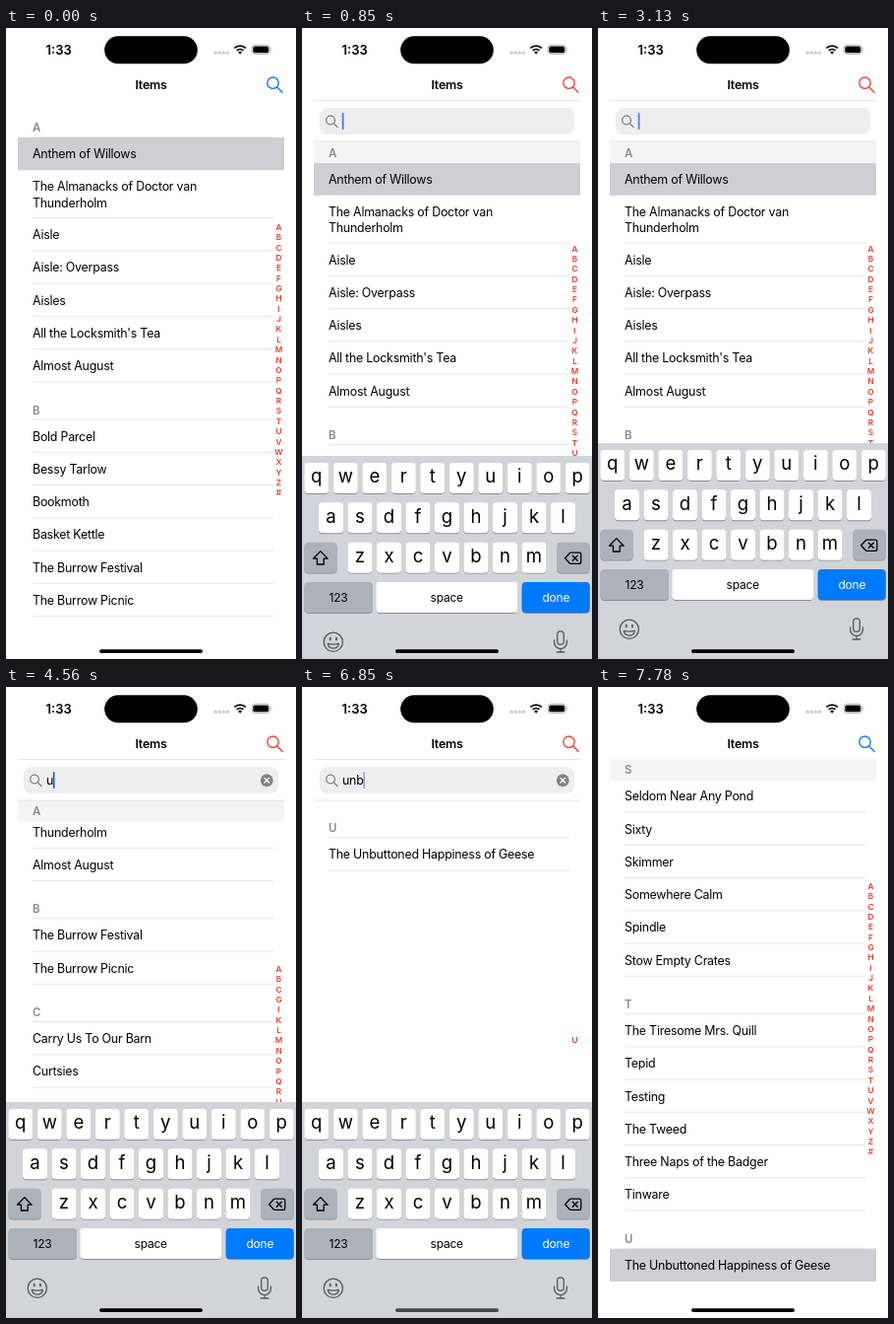
An HTML page that plays this animation: 295x640 px, repeating every 8000 ms.

```html
<!DOCTYPE html>
<html lang="en">
<head>
<meta charset="utf-8">
<title>Item search</title>
<style>
  html, body { margin: 0; width: 100%; height: 100%; overflow: hidden; background: #fff; }
  svg { display: block; width: 100vw; height: 100vh; font-family: Inter, Roboto, sans-serif; }
  .body { font-size: 12.4px; letter-spacing: -.23px; }
  .head { font-size: 11.4px; font-weight: 600; fill: #8a8a8e; }
  .mid { text-anchor: middle; }
  .bold { font-weight: 600; }
  .key { font-size: 18.6px; text-anchor: middle; }
  .label { font-size: 12px; letter-spacing: -.2px; text-anchor: middle; }
  .index { font-size: 8.2px; font-weight: 600; fill: #f03a28; text-anchor: middle; }
  .line { stroke: #dededf; stroke-width: .75; }
  .icon { fill: none; stroke-width: 1.3; stroke-linecap: round; stroke-linejoin: round; }
</style>
</head>
<body>
<svg viewBox="0 0 295 640">
  <clipPath id="view"><rect y="73" width="295" height="531"/></clipPath>
  <g clip-path="url(#view)">
    <g id="list"></g>
    <g id="index"></g>
    <g id="search">
      <rect x="0" y="73" width="295" height="42" fill="#fff"/>
      <path class="line" d="M12 73.5H283M12 115H283"/>
      <rect x="18" y="81" width="259" height="27" rx="7.5" fill="#eeeeef"/>
      <g class="icon" stroke="#7f7f84"><circle cx="29" cy="93.5" r="4.4"/><path d="M32.3 96.8L36 100.5"/></g>
      <text id="query" class="body" x="41" y="99"></text>
      <rect id="cursor" y="86" width="1.6" height="17" rx=".7" fill="#1f57dc"/>
      <g id="clear">
        <circle cx="265.3" cy="94.7" r="6.4" fill="#838387"/>
        <path class="icon" stroke="#fff" d="M263 92.4l4.6 4.6m0-4.6l-4.6 4.6"/>
      </g>
    </g>
  </g>
  <rect width="295" height="73" fill="#fff"/>
  <text class="bold" x="40.5" y="26.5" font-size="13">1:33</text>
  <rect x="100.2" y="8.3" width="94.6" height="28" rx="14"/>
  <g fill="#c8c8cc">
    <circle cx="213.2" cy="25.2" r="1.6"/><circle cx="217.2" cy="25.2" r="1.6"/>
    <circle cx="221.2" cy="25.2" r="1.6"/><circle cx="225.2" cy="25.2" r="1.6"/>
  </g>
  <g fill="none" stroke="#000" stroke-width="1.8">
    <path d="M232.4 20.4a8.2 8.2 0 0 1 11.4 0M234.7 22.9a5 5 0 0 1 6.8 0"/>
    <path d="M236.4 24.6a2.4 2.4 0 0 1 3.4 0L238.1 26.4z" fill="#000" stroke-width=".5"/>
  </g>
  <rect x="250" y="17.2" width="18.6" height="9.4" rx="3" fill="none" stroke="#a5a5a8" stroke-width=".8"/>
  <rect x="251.3" y="18.5" width="16" height="6.8" rx="1.9"/>
  <path d="M269.7 20.3q1.6 1.6 0 3.2z" fill="#a5a5a8"/>
  <text class="body mid bold" x="147.5" y="61.5">Items</text>
  <g id="glass" class="icon" style="stroke-width:1.4"><circle cx="271.5" cy="55.7" r="5.7"/><path d="M275.8 60L281 65.2"/></g>
  <g id="keyboard"></g>
  <rect id="home" x="95" y="630.2" width="105" height="3.7" rx="1.85"/>
</svg>
<script>
const LOOP = 8000, NAV = 73, BAR = 42, ROW = 33.25, TALL = 48.75, GAP = 38.25;
const $ = id => document.getElementById(id);
const lerp = (a, b, p) => a + (b - a) * p;

const baron = 'The Almanacks of Doctor van|Thunderholm';
const almost = 'Almost August';
const burrow = ['The Burrow Festival', 'The Burrow Picnic'];
const geese = 'The Unbuttoned Happiness of Geese';
const first = 'Anthem of Willows';
const all = [
  ['A', [first, baron, 'Aisle', 'Aisle: Overpass', 'Aisles', "All the Locksmith's Tea", almost]],
  ['B', ['Bold Parcel', 'Bessy Tarlow', 'Bookmoth', 'Basket Kettle', ...burrow]]
];
const tail = [
  ['S', ['Seldom Near Any Pond', 'Sixty', 'Skimmer', 'Somewhere Calm', 'Spindle', 'Stow Empty Crates']],
  ['T', ['The Tiresome Mrs. Quill', 'Tepid', 'Testing', 'The Tweed', 'Three Naps of the Badger', 'Tinware']],
  ['U', [geese]]
];

// Places section headers and rows, keyed by their text.
function layout(top, groups, picked) {
  const items = new Map();
  let y = top;
  for (const [letter, rows, extra = 0] of groups) {
    y += extra;
    items.set(letter, { y, header: true });
    for (const row of rows) {
      const h = row.includes('|') ? TALL : ROW;
      items.set(row, { y, h, lit: +(row === picked) });
      y += h;
    }
    y += GAP;
  }
  return items;
}

const alphabet = 'ABCDEFGHIJKLMNOPQRSTUVWXYZ#';
const stages = [
  { items: layout(111, all, first), index: alphabet },
  { items: layout(136.5, all, first), index: alphabet },
  { items: layout(115, [['A', [baron, almost]], ['B', burrow], ['C', ['Carry Us To Our Barn', 'Curtsies']]]),
    index: 'ABCGIKLMNOPQRUW', query: 'u' },
  { items: layout(150.5, [['A', [baron]], ['M', ['Millround'], 43], ['N', ['Nine at the Foundry']]]),
    index: 'AMNU', query: 'un' },
  { items: layout(153.3, [['U', [geese]]]), index: 'U', query: 'unb' },
  { items: layout(94.2, tail, geese), index: alphabet, query: 'unb' }
];

// Stepped tracks of [time, value].
const stageTrack = [[0, 0], [500, .15], [630, .6], [740, .95], [850, 1],
  [3910, 1.15], [4020, 1.55], [4140, 1.85], [4260, 2],
  [4910, 2.15], [5030, 2.5], [5150, 2.75], [5270, 2.93], [5400, 3],
  [5650, 3.2], [5770, 3.55], [5880, 3.8], [5990, 3.95], [6100, 4],
  [7240, 4.15], [7350, 4.5], [7460, 4.85], [7570, 4.96], [7680, 5]];
const keyboardTrack = [[0, 219], [630, 150], [740, 55], [850, 13], [980, 3], [1090, 0],
  [7240, 15], [7350, 90], [7460, 175], [7570, 212], [7680, 219]];
const cursorTrack = [[0, 0], [740, .85], [980, 1], [1460, .5], [1570, 0], [2110, .5], [2230, 1],
  [2470, .5], [2580, 0], [3130, .8], [3240, 1], [3480, .5], [3600, 0], [3910, 1], [4670, 0],
  [4910, 1], [5990, .5], [6100, 0], [6360, .5], [6480, 1], [6720, .75], [6850, .5]];
const homeTrack = [[0, 1], [5650, .9], [5880, .8], [6100, .66], [7240, 1]];
const at = (track, t) => track.findLast(step => step[0] <= t)[1];

function drawRow(title, y, { h }, lit, opacity) {
  const lines = title.split('|').map((s, i) =>
    `<text class="body" x="27" y="${y + 21.1 + i * 16.3}">${s}</text>`).join('');
  return `<g opacity="${opacity}"><path class="line" opacity="${1 - lit}" d="M27 ${y + h - .4}H272"/>
    <rect x="12" y="${y}" width="271" height="${h}" fill="#cfced4" opacity="${lit}"/>${lines}</g>`;
}

function drawHeader(letter, y, bar, opacity) {
  const stuck = y < bar + 24, text = Math.max(y - 10, bar + 11);
  const back = stuck
    ? `<rect x="12" y="${text - 11}" width="271" height="21.5" fill="#f4f4f4"/>`
    : `<path class="line" d="M27 ${y - .4}H272"/>`;
  return `<g opacity="${opacity}">${back}<text class="head" x="27" y="${text + 4}">${letter}</text></g>`;
}

function drawList(stage, bar) {
  const to = Math.ceil(stage), from = Math.max(0, to - 1), p = to ? stage - from : 1;
  const a = stages[from].items, b = stages[to].items;
  const enter = to === 5 ? 0 : 220;
  let rows = '', headers = '';
  for (const key of new Set([...a.keys(), ...b.keys()])) {
    const old = a.get(key), now = b.get(key), item = now || old;
    const opacity = old && now ? 1 : now ? p : 1 - p;
    if (!opacity) continue;
    const y = old && now ? lerp(old.y, now.y, p) : now ? now.y + enter * (1 - p) : old.y;
    if (item.header) headers += drawHeader(key, y, bar, opacity);
    else rows += drawRow(key, y, item, old && now ? lerp(old.lit, now.lit, p) : item.lit, opacity);
  }
  return rows + headers;
}

function drawIndex(letters, open) {
  const pitch = 10.37, top = 336.7 + 21.8 * open - (letters.length - 1) * pitch / 2;
  return [...letters].map((c, i) =>
    `<text class="index" x="277.5" y="${top + i * pitch + 2.9}">${c}</text>`).join('');
}

function drawKeyboard() {
  const cap = (x, y, w, fill) =>
    `<rect x="${x}" y="${y + .9}" width="${w}" height="31" rx="3.8" fill="#8b8d92"/>
     <rect x="${x}" y="${y}" width="${w}" height="31" rx="3.8" fill="${fill}"/>`;
  const letters = (keys, left, y) => [...keys].map((c, i) => {
    const x = left + i * 29.5;
    return cap(x - 12.5, y, 25, '#fff') + `<text class="key" x="${x}" y="${y + 20.3}">${c}</text>`;
  }).join('');
  const label = (s, x, fill) => `<text class="label" x="${x}" y="568.8" fill="${fill}">${s}</text>`;
  const grey = '#adb1ba';
  return `<rect y="421" width="295" height="219" fill="#d2d4da"/>`
    + letters('qwertyuiop', 14.8, 428) + letters('asdfghjkl', 29.5, 468.3) + letters('zxcvbnm', 59, 508.7)
    + cap(2.5, 508.7, 33, grey) + cap(259.5, 508.7, 33, grey)
    + cap(2.5, 549, 69.5, grey) + cap(75.3, 549, 144.2, '#fff') + cap(223.7, 549, 69, '#007aff')
    + label('123', 37, '#000') + label('space', 147.2, '#000') + label('done', 258.3, '#fff')
    + `<g class="icon" stroke="#000">
        <path d="M18.8 517.6l7.3 7.6h-3.9v5.8h-6.8v-5.8h-3.9z"/>
        <path d="M267.6 524.7l4.6-5q.6-.6 1.4-.6h8.3q1.9 0 1.9 1.9v7.4q0 1.9-1.9 1.9h-8.3q-.8 0-1.4-.6zM275.3 522.2l5 5m0-5l-5 5"/>
      </g>
      <g class="icon" stroke="#55575c">
        <circle cx="31.8" cy="609.8" r="9.6"/>
        <path d="M26.2 611.3q5.6 1.6 11.2 0q-.9 4.8-5.6 4.8t-5.6-4.8z"/>
        <path d="M28.7 605.8v1.6M34.9 605.8v1.6" stroke-width="1.9"/>
        <rect x="259.7" y="598.8" width="6.6" height="13.6" rx="3.3"/>
        <path d="M256.6 608v2.2a6.4 6.4 0 0 0 12.8 0v-2.2M263 616.6v3.4M259.2 620h7.6"/>
      </g>`;
}

$('keyboard').innerHTML = drawKeyboard();
let shown;

function render(t) {
  const stage = at(stageTrack, t), drop = at(keyboardTrack, t);
  const cursor = at(cursorTrack, t), home = at(homeTrack, t);
  const state = [stage, drop, cursor, home].join();
  if (state === shown) return;
  shown = state;

  const open = Math.min(1, stage, 5 - stage);
  const { index, query = '' } = stages[Math.ceil(stage)];
  $('list').innerHTML = drawList(stage, NAV + BAR * open);
  $('index').innerHTML = drawIndex(index, open);
  $('search').setAttribute('transform', `translate(0 ${-BAR * (1 - open)})`);
  $('search').setAttribute('visibility', open > 0 ? 'visible' : 'hidden');
  $('query').textContent = query;
  $('clear').setAttribute('opacity', query ? 1 : 0);
  $('cursor').setAttribute('x', 40.8 + (query ? $('query').getComputedTextLength() : 0));
  $('cursor').setAttribute('opacity', cursor);
  $('glass').setAttribute('stroke', stage > 0 && stage <= 4 ? '#f8402e' : '#0a7cf5');
  $('keyboard').setAttribute('transform', `translate(0 ${drop})`);
  $('home').setAttribute('opacity', home);
}

const start = performance.now();
function tick() {
  render((performance.now() - start) % LOOP);
  requestAnimationFrame(tick);
}
tick();
</script>
</body>
</html>
```
